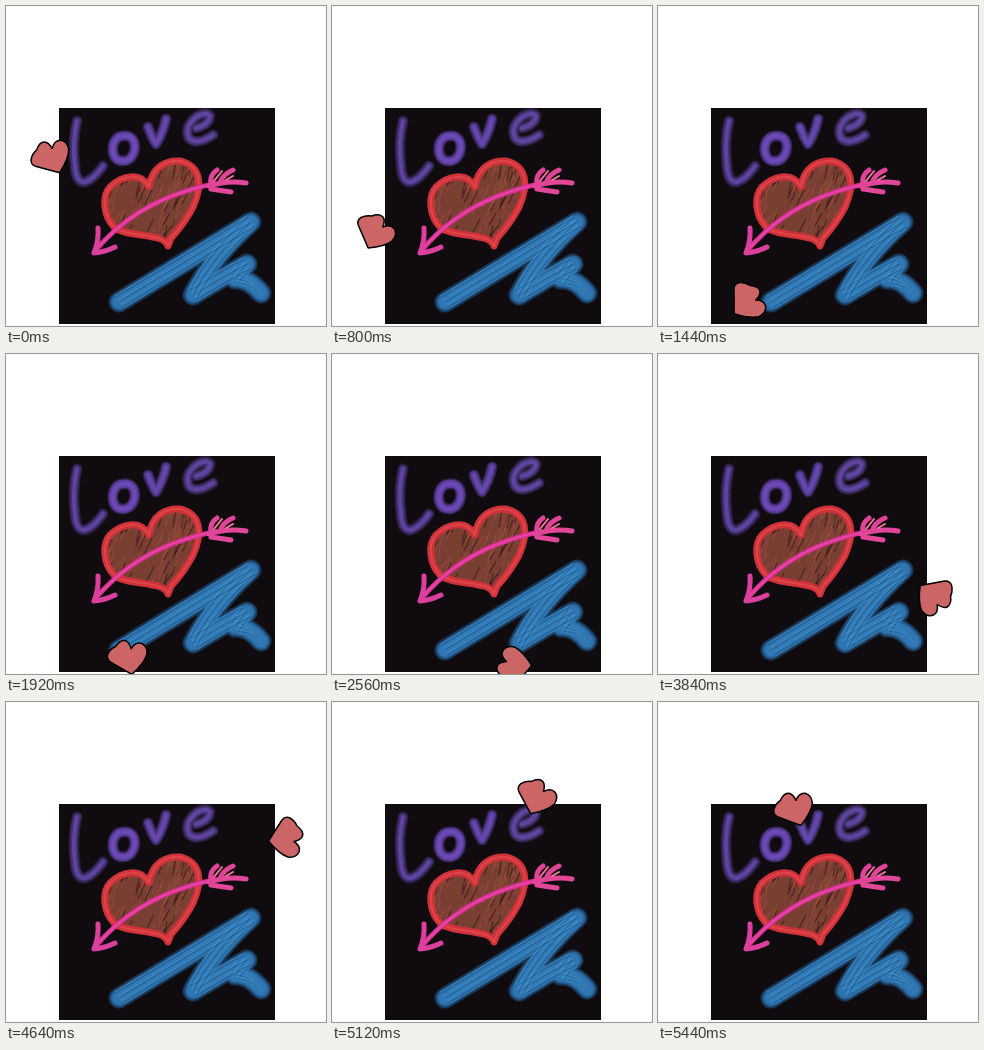
These frames come from a looping animation (320x320 px, 5600 ms). An HTML page with a canvas:

```html
<!DOCTYPE html>
<html>
<head>
<meta charset="utf-8">
<title>Chalk love</title>
<style>
html, body { margin: 0; width: 100%; height: 100%; overflow: hidden; background: #fff; }
canvas { display: block; width: 320px; height: 320px; }
</style>
</head>
<body>
<canvas id="stage" width="320" height="320"></canvas>
<script>
const ctx = document.getElementById('stage').getContext('2d');
const board = document.createElement('canvas');
board.width = board.height = 320;
const art = board.getContext('2d');

const STEP = 160, STEPS = 35;

// step, x, y, degrees
const route = [
  [1, 45, 150, -18], [5, 44, 225, 34], [8, 64, 272, 50], [9, 90, 295, 57],
  [15, 154, 309, -62], [16, 181, 312, -82], [22, 259, 272, -188],
  [24, 277, 243, -223], [26.5, 294, 190, -246], [29, 281, 136, -270],
  [30.5, 254, 106, -301], [32, 205, 94, -331], [34, 136, 106, -372]
];

const smallHeart = new Path2D(
  'M3 18.5L-18 5Q-22 2-20-3Q-17-8-12-10Q-7-17-2-15.5Q2-14 3.5-7Q8-14 14-12Q20-9 19-1Q16 8 3 18.5Z');

let seed = 7;
const random = () => (seed = seed * 16807 % 2147483647) / 2147483647;

function line(d, color, width, alpha = 1) {
  art.globalAlpha = alpha;
  art.strokeStyle = color;
  art.lineWidth = width;
  art.stroke(new Path2D(d));
  art.globalAlpha = 1;
}

// Fine parallel strands laid over a broad stroke
function strands(d, colors, spread, count) {
  for (let i = 0; i < count; i++) {
    const offset = (i / (count - 1) - 0.5) * spread;
    art.save();
    art.translate(offset * 0.55, offset * 0.83);
    line(d, colors[i % colors.length], 1.1, 0.5);
    art.restore();
  }
}

function drawLetters() {
  const letters = [
    ['M71 115Q66 136 69 160Q70 177 79 176Q88 173 97 160', '#49357f'],
    ['M117 130C104 130 103 155 116 155C129 156 133 136 124 131Q121 129 117 130', '#6845b4'],
    ['M142 121Q146 132 150 138Q157 127 160 113', '#5b40a0'],
    ['M190 122Q203 119 204 110Q200 105 190 111Q178 121 183 132Q190 140 207 129', '#4d387f']
  ];
  for (const [d, color] of letters) {
    line(d, color, 11, 0.4);
    line(d, color, 8, 0.75);
    line(d, '#7d58d0', 4, 0.5);
  }
}

function drawBigHeart() {
  const d = 'M162 240C158 226 121 232 108 221C97 209 96 190 104 181C114 171 134 164 143 181' +
    'C146 161 160 154 174 155C195 160 197 179 187 201Q178 218 165 232Z';
  art.save();
  art.clip(new Path2D(d));
  art.fillStyle = '#7a3f33';
  art.fillRect(95, 150, 105, 95);
  for (let i = 0; i < 150; i++) {
    const x = 95 + random() * 100, y = 160 + random() * 80;
    line(`M${x} ${y}l${2 + random() * 5} ${-7 - random() * 8}`,
      ['#2a1513', '#9a533e', '#a94840'][i % 3], 1.2, 0.6);
  }
  art.restore();
  line(d, '#cf323b', 7);
  line(d, '#e9504e', 2, 0.65);
}

function drawArrow() {
  const shaft = 'M89 245Q120 208 166 190Q190 181 208 178';
  line(shaft, '#d62f91', 5);
  line(shaft, '#ec4ca8', 2, 0.8);
  line('M92 222Q93 235 88 247Q99 246 109 241', '#dc409f', 5);
  line('M203 180Q222 174 240 177M205 183L225 186', '#e2479a', 5);
  line('M205 179Q203 169 211 164M214 177Q217 168 227 164', '#e04496', 5);
  line('M208 175L216 165M220 174L227 170', '#f27a9b', 2);
}

function drawScribble() {
  const d = 'M113 296L245 216Q207 250 187 289Q213 273 241 258Q234 265 229 273Q243 272 255 287';
  line(d, '#24659d', 21, 0.5);
  line(d, '#2c70ad', 17, 0.75);
  line(d, '#327fbe', 13, 0.7);
  strands(d, ['#4c9bd4', '#1d548a', '#3c8bc6'], 15, 9);
}

function drawBoard() {
  art.lineCap = art.lineJoin = 'round';
  art.fillStyle = '#fff';
  art.fillRect(0, 0, 320, 320);
  art.beginPath();
  art.rect(53, 102, 216, 216);
  art.clip();
  art.fillStyle = '#0f0b0e';
  art.fillRect(53, 102, 216, 216);
  drawLetters();
  drawScribble();
  drawBigHeart();
  drawArrow();
}

function poseAt(step) {
  const s = Math.max(step, 1);
  const i = Math.max(1, route.findIndex(p => p[0] >= s));
  const a = route[i - 1], b = route[i];
  const k = (s - a[0]) / (b[0] - a[0]);
  return a.map((v, j) => v + (b[j] - v) * k);
}

function frame(now) {
  const step = Math.floor(Math.max(now - start, 0) / STEP) % STEPS;
  const [, x, y, turn] = poseAt(step);
  ctx.drawImage(board, 0, 0);
  ctx.save();
  ctx.translate(x, y);
  ctx.rotate(turn * Math.PI / 180);
  ctx.fillStyle = '#cc6666';
  ctx.strokeStyle = '#000';
  ctx.lineWidth = 1.5;
  ctx.lineJoin = 'round';
  ctx.fill(smallHeart);
  ctx.stroke(smallHeart);
  ctx.restore();
  requestAnimationFrame(frame);
}

drawBoard();
const start = performance.now();
frame(start);
</script>
</body>
</html>
```
